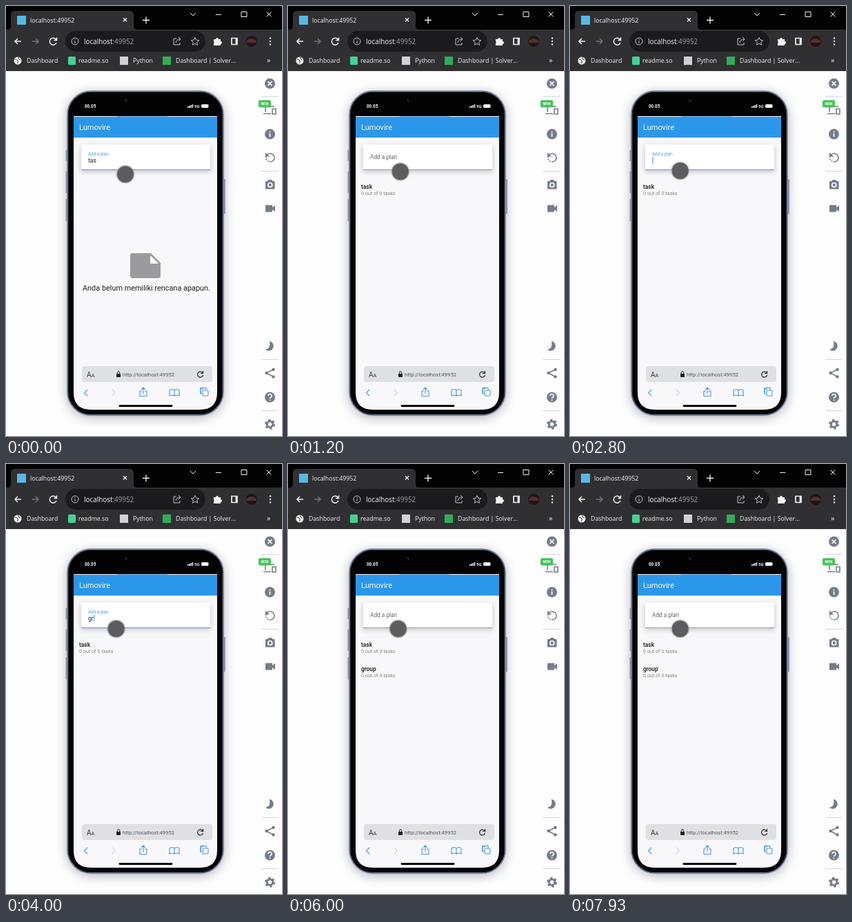
These frames come from a looping animation (400x621 px, 8000 ms). An HTML page:

```html
<!DOCTYPE html>
<html lang="en">
<head>
<meta charset="utf-8">
<style>
  html, body { margin: 0; width: 100%; height: 100%; overflow: hidden; background: #fdfdfd; }
  svg { display: block; width: 400px; height: 621px; }
  text { font-family: Roboto, sans-serif; }
  .ui text { font-family: "Open Sans", sans-serif; fill: #f3f3f5; font-size: 8.8px; }
  .ui .address { font-size: 9.9px; }
  .ui .more { font-size: 11px; }
  .line { fill: none; stroke: #f3f3f5; stroke-width: 1.3; }
  .tool { fill: #757d8b; }
  .tool .stroke { fill: none; stroke: #757d8b; stroke-width: 1.6; }
  .tool .cut { fill: none; stroke: #fdfdfd; stroke-width: 1.7; }
  .nav { fill: none; stroke: #4896dc; stroke-width: 1.1; }
  .name { font-size: 8.4px; fill: #161618; font-weight: 500; }
  .sub { font-size: 7.2px; fill: #85858a; }
</style>
</head>
<body>
<svg viewBox="0 0 400 621">
  <defs>
    <filter id="glow" x="-30%" y="-30%" width="160%" height="160%"><feGaussianBlur stdDeviation="7"/></filter>
    <filter id="soft" x="-20%" y="-50%" width="140%" height="200%"><feGaussianBlur stdDeviation="3"/></filter>
  </defs>
  <rect width="400" height="621" fill="#fdfdfd"/>

  <g class="ui">
    <rect width="400" height="94" fill="#030304"/>
    <path d="M0 34H3Q7 34 7 29V13Q7 7 13 7H179Q185 7 185 13V29Q185 34 190 34H400V94H0Z" fill="#303033"/>
    <rect x="86" y="36" width="203" height="30" rx="15" fill="#1b1b1e"/>
    <rect x="16" y="14" width="13" height="13" fill="#55b9e8"/>
    <text x="35" y="24">localhost:49952</text>
    <g class="line">
      <path d="M170 17.500l5 5m0-5l-5 5M198 20.500h10m-5-5v10"/>
      <path d="M267 10l4 4 4-4M304 12.500h8M341 8.500h8v7h-8zM377.500 8.500l7 7m0-7l-7 7" stroke-width="1"/>
      <path d="M22 51H13m4-4l-4 4 4 4" stroke-width="1.5"/>
      <path d="M38 51h9m-4-4l4 4-4 4" stroke="#747478" stroke-width="1.5"/>
      <path d="M72.500 48.500A5 5 0 1 0 73 53M73.500 45.500v4h-4" stroke-width="1.5"/>
      <g stroke="#c2c2c6" stroke-width="1">
        <circle cx="100" cy="51" r="5"/>
        <path d="M100 50v4m0-6.300v1.200"/>
        <path d="M247 47h-4v9h9v-3M246 53q1-5 6-5m-2-3l3 3-3 3"/>
        <path d="M274 45.500l1.700 3.600 4 .5-3 2.700.8 4-3.500-2-3.500 2 .8-4-3-2.700 4-.5z"/>
      </g>
      <path d="M327 46.500h8v9h-8zM333.500 46v10" stroke-width="1.7"/>
    </g>
    <g fill="#f3f3f5">
      <path d="M301 48h3a2 2 0 1 1 4 0h3v3a2 2 0 1 1 0 4v2h-10v-3a2 2 0 0 0 0-3z"/>
      <circle cx="383" cy="46.500" r="1.200"/><circle cx="383" cy="51" r="1.200"/><circle cx="383" cy="55.500" r="1.200"/>
    </g>
    <circle cx="356" cy="51" r="8" fill="#201416"/>
    <path d="M349 50q6-6 14 0v3h-14z" fill="#56302c"/>
    <text class="address" x="113" y="55">localhost<tspan fill="#9e9ea4">:49952</tspan></text>
    <circle cx="17" cy="79" r="5.500" fill="#f3f3f5"/>
    <path d="M13 77q3 0 4 2t-1 4M18 74q-1 3 3 4" stroke="#303033" fill="none"/>
    <text x="30" y="82">Dashboard</text>
    <rect x="90" y="73" width="11" height="12" rx="1.500" fill="#43d292"/>
    <text x="105" y="82">readme.so</text>
    <rect x="165" y="73" width="12" height="12" fill="#d0d2d6"/>
    <text x="184" y="82">Python</text>
    <rect x="227" y="73" width="12" height="12" fill="#2fae57"/>
    <text x="246" y="82">Dashboard | Solver...</text>
    <text class="more" x="378" y="82">»</text>
  </g>

  <g>
    <rect x="86" y="123" width="232" height="474" rx="38" fill="#6f7488" opacity=".4" filter="url(#glow)"/>
    <path d="M88 208v16m0 15v31m0 9v32M316.500 250v50" stroke="#8b98b4" stroke-width="3"/>
    <rect x="89" y="123" width="226" height="468" rx="34" fill="#030304" stroke="#78849c" stroke-width="1.800"/>
    <rect x="90.500" y="124.500" width="223" height="465" rx="32.500" fill="none" stroke="#20242c"/>
    <path d="M98 159H306V558Q306 583 281 583H123Q98 583 98 558Z" fill="#f8f8fa"/>
    <rect x="98" y="160" width="208" height="30" fill="#2b97eb"/>
    <path d="M161 159.500h73" stroke="#8abfec"/>
    <path d="M172 136h3l-1 3" stroke="#3c4a55" fill="none" stroke-width=".8"/>
    <g fill="#fff" font-weight="700">
      <text x="114" y="147" font-size="6.300">00.05</text>
      <path d="M263 145h1.500v2H263zm2.300-1h1.500v3h-1.500zm2.300-1h1.500v4h-1.500zm2.300-1h1.300v5h-1.300z"/>
      <text x="273" y="147" font-size="6">5G</text>
      <rect x="283" y="142" width="10.500" height="5" rx="1.500"/>
    </g>
    <text x="106" y="179" font-size="11" fill="#f4faff">Lumovire</text>
  </g>

  <rect x="108" y="202" width="189" height="38" rx="3" fill="#777784" opacity=".35" filter="url(#soft)"/>
  <rect x="109" y="200" width="187" height="37" rx="2" fill="#fff"/>
  <path id="underline" d="M109 236.500h187"/>
  <text id="label" x="119">Add a plan</text>
  <text id="field" x="119" y="226" font-size="8.600" fill="#202022"></text>
  <rect id="caret" y="218" width="1" height="9.500" fill="#3d92cc"/>

  <g id="empty">
    <path d="M183 357H210L224 371V390Q224 393 221 393H183Q180 393 180 390V360Q180 357 183 357Z" fill="#9b9b9e"/>
    <path d="M209 360V372H221Z" fill="#fbfbfc"/>
    <text x="111" y="411" font-size="10.900" fill="#222224">Anda belum memiliki rencana apapun.</text>
  </g>
  <g id="plans"></g>

  <g>
    <rect x="110" y="520" width="189" height="23" rx="4" fill="#dfe0e4"/>
    <text x="117" y="536" font-size="10" fill="#343438">A<tspan font-size="7.500">A</tspan></text>
    <rect x="160" y="531" width="6" height="5" rx=".7" fill="#202022"/>
    <path d="M161.300 531v-1.500a1.700 1.700 0 0 1 3.400 0v1.500" fill="none" stroke="#202022"/>
    <text x="169" y="535" font-size="7.600" fill="#55555b">http://localhost:49952</text>
    <path d="M285 530A4 4 0 1 0 285.500 533M285.500 527v3.500h-3.500" fill="none" stroke="#28282b" stroke-width="1.200"/>
    <g class="nav">
      <path d="M118 554l-4.500 4.500 4.500 4.500"/>
      <path d="M154 554l4.500 4.500-4.500 4.500" stroke="#cfd5de"/>
      <path d="M197 556h-3v7.500h10V556h-3M199 560v-9m-3 3l3-3 3 3"/>
      <path d="M244 555q-3.500-2.500-7 0v8q3.500-2 7 0 3.500-2 7 0v-8q-3.500-2.500-7 0v8"/>
      <path d="M285 554v-2h-3v8h2"/>
      <rect x="285" y="555" width="8" height="8" rx="1.500"/>
      <path d="M282 560V553q0-1.500 1.500-1.500H290v3"/>
    </g>
    <path d="M165 577.500H240" stroke="#050505" stroke-width="2.800" stroke-linecap="round"/>
  </g>

  <g class="tool">
    <path d="M370 130.500h25M370 238.500h25M370 510.500h25M370 584.500h25" stroke="#d2d6df"/>
    <circle cx="382.500" cy="112" r="7.500"/>
    <path class="cut" d="M379.500 109l6 6m0-6l-6 6"/>
    <path class="stroke" d="M376 153v-8h13M373 155.500h11M386 148.500h5v7.500h-5z"/>
    <rect x="366" y="136" width="18" height="10.500" rx="2" fill="#45c45a"/>
    <text x="375" y="143.300" font-size="5.200" font-weight="700" fill="#fff" text-anchor="middle">NEW</text>
    <circle cx="382.500" cy="185" r="7.500"/>
    <path class="cut" d="M382.500 184v5m0-8v1.700"/>
    <path class="stroke" d="M378 215.500a6 6 0 0 1 5-2.500a6 6 0 0 1 0 12"/>
    <path class="stroke" d="M377 217a6 6 0 0 0 6 8" stroke-dasharray="2 1.500"/>
    <path d="M376 211.500v6h6z"/>
    <path d="M376 253h3l1.500-2h4.500l1.500 2h3v11.500h-13.500z"/>
    <circle class="cut" cx="382.700" cy="258.500" r="3"/>
    <path d="M376 287.500h10v3.500l4-3v9l-4-3v3.500h-10z"/>
    <path d="M382 484a7 7 0 1 1-6 12q8-1 6-12z"/>
    <path class="stroke" d="M387.500 525l-10 5 10 5.500"/>
    <circle cx="387.500" cy="525" r="2.200"/><circle cx="377.500" cy="530" r="2.200"/><circle cx="387.500" cy="535.500" r="2.200"/>
    <circle cx="382.500" cy="565" r="7.500"/>
    <path class="cut" d="M380 563a2.500 2.500 0 1 1 3.500 2.300q-1 .5-1 1.700m0 1.500v1.500" stroke-width="1.400"/>
    <circle cx="382.500" cy="604" r="4.200" fill="none" stroke="#757d8b" stroke-width="3"/>
    <circle cx="382.500" cy="604" r="6.200" fill="none" stroke="#757d8b" stroke-width="2.600" stroke-dasharray="3.200 3.290"/>
  </g>

  <g id="pointer">
    <circle r="13.500" fill="#a2a2a6" opacity=".6"/>
    <circle r="12" fill="#5d5d60"/>
  </g>
</svg>
<script>
const LOOP = 8000;
const $ = id => document.getElementById(id);

// Each edit: [time, field text, focused, saved plans]
const edits = [
  [0, "tas", true, 0], [130, "task", true, 0], [950, "", false, 1], [1330, "", true, 1],
  [3480, "g", true, 1], [3820, "gr", true, 1], [4080, "gro", true, 1],
  [4300, "grou", true, 1], [4520, "group", true, 1], [5130, "", false, 2]
];

$("plans").innerHTML = ["task", "group"].map((name, i) => `<g transform="translate(106 ${264 + i * 34.5})">
  <text class="name">${name}</text><text class="sub" y="9">0 out of 0 tasks</text></g>`).join("");

const clamp = x => Math.max(0, Math.min(1, x));
const ease = x => x * x * (3 - 2 * x);
const progress = (t, start, length) => ease(clamp((t - start) / length));
const mix = (a, b, k) => a + (b - a) * k;
const show = (node, on) => node.setAttribute("visibility", on ? "visible" : "hidden");

function draw(t) {
  const [since, value, focused, count] = edits.findLast(edit => edit[0] <= t);

  const raised = 1 - progress(t, 950, 160) + progress(t, 1330, 160) - progress(t, 5130, 160);
  $("label").setAttribute("y", mix(221, 216, raised));
  $("label").setAttribute("font-size", mix(8.3, 6.3, raised));
  $("label").setAttribute("fill", focused ? "#45a3e0" : "#666669");
  $("underline").setAttribute("stroke", focused ? "#8fa8d4" : "#9a9aa2");
  $("underline").setAttribute("stroke-width", focused ? 1.5 : 1);

  $("field").textContent = value;
  $("caret").setAttribute("x", 119.5 + $("field").getComputedTextLength());
  show($("caret"), focused && since > 0 && (t - since) % 1000 < 500);

  show($("empty"), count === 0);
  [...$("plans").children].forEach((plan, i) => show(plan, i < count));

  const moved = progress(t, 1050, 220);
  $("pointer").setAttribute("transform", `translate(${mix(173, 159.7, moved)} ${mix(243, 238, moved)})`);
}

function tick() {
  draw(performance.now() % LOOP);
  requestAnimationFrame(tick);
}
tick();
</script>
</body>
</html>
```
